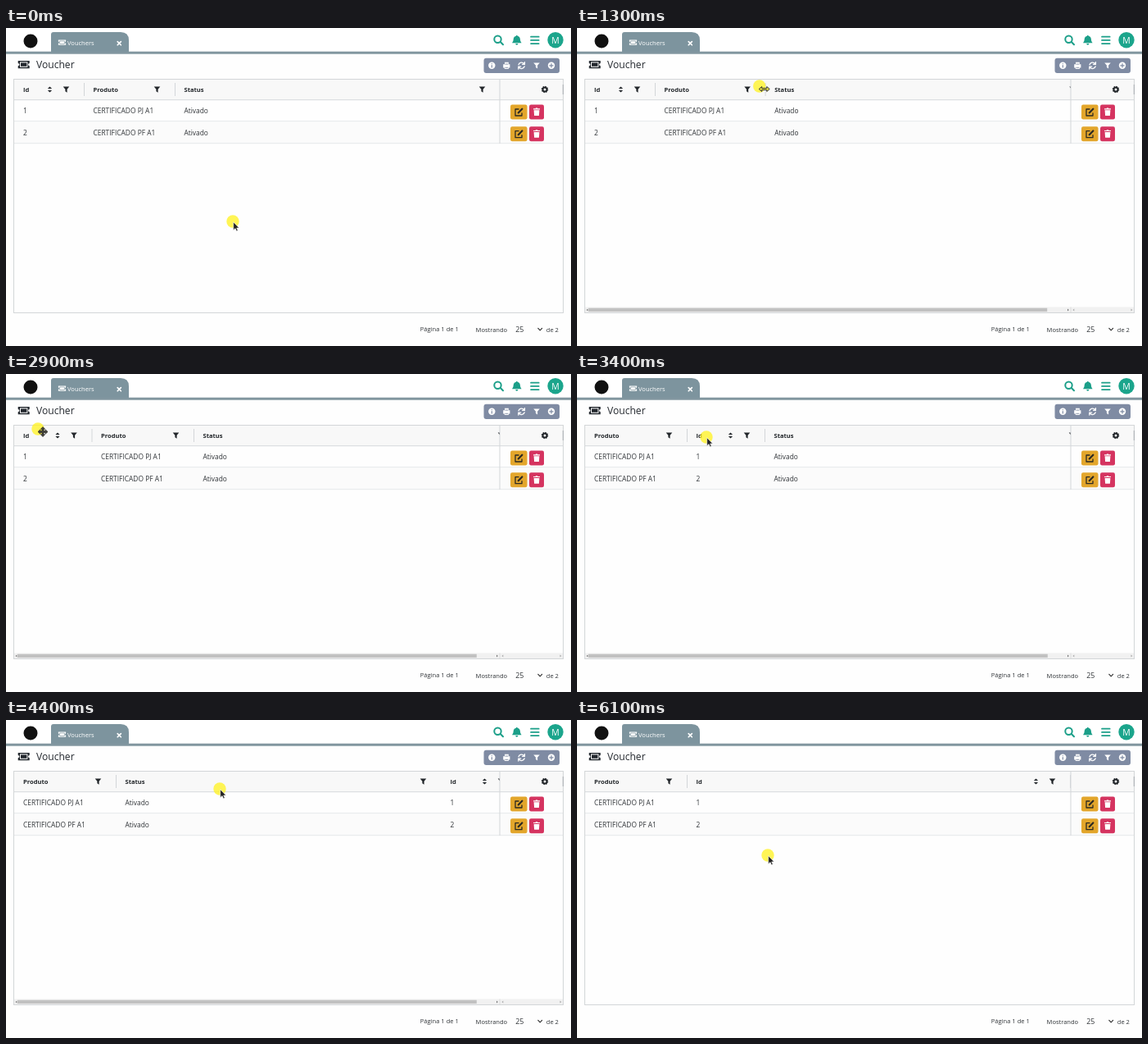
An HTML page that plays this animation: 690x388 px, repeating every 6400 ms.

```html
<!DOCTYPE html>
<html lang="pt-BR">
<head>
<meta charset="utf-8">
<title>Voucher</title>
<style>
  html, body { margin: 0; width: 100%; height: 100%; overflow: hidden; background: #fefefe; }
  svg { display: block; }
  text { font: 8.4px "Open Sans", "Noto Sans", sans-serif; fill: #303438; }
  .head { font-size: 7.6px; font-weight: 700; fill: #22262a; }
  .small { font-size: 7.55px; }
  .title { font-size: 12.1px; font-weight: 500; fill: #23282e; }
  .white { fill: #fff; }
  .line { fill: none; stroke-linecap: round; stroke-linejoin: round; }
</style>
</head>
<body>
<svg id="stage" width="690" height="388" viewBox="0 0 690 388">
  <defs>
    <path id="funnel" d="M-3.8-3.4H3.8L1.1-.2V3.7L-1.1 2.2V-.2Z"/>
    <path id="sort" d="M-2.6-.9L0-3.6L2.6-.9ZM-2.6.9L0 3.6L2.6.9Z"/>
    <g id="ticket">
      <path fill="currentColor" d="M-7-4.7H7V-1.7A1.7 1.7 0 0 0 7 1.7V4.7H-7V1.7A1.7 1.7 0 0 0-7-1.7Z"/>
      <rect x="-4.2" y="-2.7" width="8.4" height="5.4" fill="none" stroke="var(--inner)" stroke-width="1"/>
    </g>
    <g id="gear">
      <circle r="2.5" fill="none" stroke="#22262a" stroke-width="2"/>
      <circle r="3.6" fill="none" stroke="#22262a" stroke-width="1.3" stroke-dasharray="1.41"/>
    </g>
    <g id="actions">
      <rect x="616" y="93.5" width="20.5" height="18" rx="2.2" fill="#e3a62b"/>
      <g class="line" stroke="#2d2a22" stroke-width="1.3">
        <path d="M626 99H622V107H630V104"/>
        <path d="M625.7 103.5L630.3 98.8" stroke-width="2.3"/>
      </g>
      <rect x="639" y="93.5" width="18" height="18" rx="2.2" fill="#d53460"/>
      <path class="white" d="M644 98.3H646.6L647 97.5H649L649.4 98.3H652V99.4H644ZM644.6 100.2H651.4L650.9 107H645.1Z"/>
    </g>
    <path id="arrow" d="M0 0V10L2.3 7.9L3.9 11.2L5.5 10.4L4 7.3H7Z" fill="#222" stroke="#fff" stroke-width=".6"/>
    <path id="resize" d="M-6.5 0L-3-3V-1H3V-3L6.5 0L3 3V1H-3V3Z" fill="#e6df45" stroke="#333" stroke-width="1"/>
    <path id="move" d="M0-6L2.6-3.2H1V-1H3.2V-2.6L6 0L3.2 2.6V1H1V3.2H2.6L0 6L-2.6 3.2H-1V1H-3.2V2.6L-6 0L-3.2-2.6V-1H-1V-3.2H-2.6Z" fill="#44443a" stroke="#222" stroke-width=".7"/>
    <clipPath id="scrollArea"><rect x="10" y="63" width="593" height="284"/></clipPath>
  </defs>

  <!-- top bar -->
  <rect width="690" height="29" fill="#fff"/>
  <rect y="28.7" width="690" height="3" fill="#81969f"/>
  <circle cx="30" cy="16" r="8.5" fill="#111"/>
  <path d="M55 29V8Q55 5 58 5H140Q150 5 150 15V29Z" fill="#7d949e"/>
  <use href="#ticket" transform="translate(68.5 17.7) scale(.66)" style="color:#fff;--inner:#7d949e"/>
  <text class="small white" x="75" y="20.7">Vouchers</text>
  <path class="line" d="M136.2 16.6L140.4 20.8M140.4 16.6L136.2 20.8" stroke="#fff" stroke-width="1.6"/>
  <g class="line" stroke="#1c9f89" stroke-width="2">
    <circle cx="600.5" cy="13.7" r="4.2"/>
    <path d="M603.8 17L607 20.2"/>
    <path d="M641 10.7H650.7M641 14.9H650.7M641 19.1H650.7" stroke-width="1.7"/>
  </g>
  <path fill="#1c9f89" d="M618 18.2Q619.7 16.7 619.7 13.7Q619.9 10.5 623 9.8V9H624.6V9.8Q627.7 10.5 627.9 13.7Q627.9 16.7 629.6 18.2ZM622.2 19H625.4Q625.2 20.8 623.8 20.8Q622.4 20.8 622.2 19"/>
  <circle cx="671" cy="14.7" r="9.7" fill="#1ba58c"/>
  <text class="white" x="671" y="18.6" text-anchor="middle" style="font-size:10.5px">M</text>

  <!-- title and toolbar -->
  <use href="#ticket" transform="translate(21.7 44.6)" style="color:#23282e;--inner:#fefefe"/>
  <text class="title" x="37" y="49">Voucher</text>
  <rect x="583.5" y="36.7" width="92.5" height="18.3" rx="3" fill="#7f8ba3"/>
  <g class="white">
    <circle cx="593.3" cy="45.8" r="4.2"/>
    <path d="M609 41.8H613.8V44.3H615.4V48.4H613.8V50H608.8V48.4H607.2V44.3H609Z"/>
    <use href="#funnel" x="648" y="45.8"/>
    <circle cx="666" cy="45.8" r="4.2"/>
  </g>
  <g class="line" stroke="#7f8ba3" stroke-width="1.2">
    <path d="M593.3 43.6V43.7M593.3 45.6V48M663.8 45.8H668.2M666 43.6V48"/>
    <path d="M609.8 44.1H613M609.8 48.3H612.8" stroke-width=".9"/>
  </g>
  <path class="line" stroke="#fff" stroke-width="1.3" d="M626 44.8A3.8 3.8 0 0 1 632.6 43.5M633.4 41.6V44.4H630.6M633.2 46.8A3.8 3.8 0 0 1 626.6 48.1M625.8 50V47.2H628.6"/>

  <!-- grid -->
  <rect x="9.5" y="62.5" width="671" height="285" fill="#fefefe" stroke="#d3d6d8"/>
  <rect x="10" y="63" width="670" height="25" fill="#f8f8f8"/>
  <rect x="10" y="114" width="670" height="27" fill="#fbfbfb"/>
  <path d="M10 87.7H680" stroke="#d6d9dc"/>
  <path d="M10 113.7H680M10 140.7H680" stroke="#e5e8ea"/>
  <g id="columns" clip-path="url(#scrollArea)"></g>
  <path d="M603 63V141" stroke="#d3d6d9"/>
  <path d="M680.3 69V81" stroke="#a5abb0"/>
  <use href="#gear" x="658" y="75"/>
  <use href="#actions"/>
  <use href="#actions" y="26.7"/>

  <g id="scrollbar">
    <rect x="10" y="340.5" width="670" height="6.5" fill="#f1f1f1"/>
    <rect id="thumb" x="14" y="341.7" height="4.4" fill="#c1c1c1"/>
    <path fill="#777" d="M13.3 342.5V345.5L11.5 344ZM599 342.5V345.5L600.8 344Z"/>
    <path fill="#aaa" d="M607.3 342.5V345.5L605.5 344ZM676.5 342.5V345.5L678.3 344Z"/>
    <path d="M603 340.5V347" stroke="#ddd"/>
  </g>

  <!-- footer -->
  <text class="small" x="505.8" y="370.3">Página 1 de 1</text>
  <text class="small" x="573.6" y="370.5">Mostrando</text>
  <text x="622.3" y="370.8" style="font-size:8.9px">25</text>
  <path class="line" d="M649.8 366.4L652.2 368.8L654.6 366.4" stroke="#333" stroke-width="1.2"/>
  <text class="small" x="659.8" y="370.5">de 2</text>

  <g id="pointer">
    <circle r="7.7" fill="#fff21f" fill-opacity=".76"/>
    <use id="shape"/>
  </g>
</svg>
<script>
const LOOP = 6400, STEP = 100;
const LEFT = 10, VIEW = 593, STATUS_WIDTH = 397;
const $ = id => document.getElementById(id);

// Each row: time, then values
const pointerPath = [
  [0, 277, 236], [200, 266, 212], [500, 213, 94], [700, 199, 70], [1000, 252, 71],
  [1400, 213, 71], [1700, 90, 70], [1900, 198, 71], [2000, 178, 71], [2300, 99, 70],
  [2600, 62, 69], [2900, 39, 67], [3200, 148, 71], [3400, 158, 77], [3600, 152, 74],
  [4100, 255, 77], [4400, 261, 84], [4600, 160, 75], [4800, 176, 62], [4900, 187, 48],
  [5000, 196, 40], [5200, 196, 40], [5500, 216, 103], [5800, 233, 165]
];
const idWidths = [[1700, 85.5], [1900, 212], [2000, 205], [2300, 95], [4900, 95], [5000, 468]];
const productWidths = [[700, 111], [1000, 165], [1400, 124.5]];
const orders = [[3000, 0], [3200, 1], [3700, 1], [3900, 2], [4800, 2], [4900, 1]];
const shapes = [
  [0, 'arrow'], [600, 'resize'], [2400, 'arrow'], [2800, 'move'], [3300, 'arrow'],
  [3600, 'move'], [4200, 'arrow'], [4700, 'move'], [5000, 'arrow']
];

function track(keys, t) {
  const next = keys.findIndex(key => key[0] > t);
  if (next === 0) return keys[0].slice(1);
  if (next < 0) return keys[keys.length - 1].slice(1);
  const a = keys[next - 1], b = keys[next];
  const k = (t - a[0]) / (b[0] - a[0]);
  return a.slice(1).map((v, i) => v + (b[i + 1] - v) * k);
}

function makeColumn(name, values, { sortable, resizable = true } = {}) {
  const group = document.createElementNS('http://www.w3.org/2000/svg', 'g');
  group.innerHTML = `
    <text class="head" x="11" y="78">${name}</text>
    ${values.map((v, i) => `<text x="11" y="${104.3 + i * 26.7}">${v}</text>`).join('')}
    <g class="edge" fill="#22262a">
      <use href="#funnel" x="-22" y="75"/>
      ${sortable ? '<use href="#sort" x="-42" y="75"/>' : ''}
      ${resizable ? '<path d="M0 67V83" stroke="#d3d6d9"/>' : ''}
    </g>`;
  $('columns').append(group);
  const edge = group.querySelector('.edge');
  return (x, width) => {
    group.setAttribute('transform', `translate(${LEFT + x} 0)`);
    edge.setAttribute('transform', `translate(${width} 0)`);
    return group;
  };
}

const placeId = makeColumn('Id', [1, 2], { sortable: true });
const placeProduct = makeColumn('Produto', ['CERTIFICADO PJ A1', 'CERTIFICADO PF A1']);
const placeStatus = makeColumn('Status', ['Ativado', 'Ativado'], { resizable: false });

function render(t) {
  const [idWidth] = track(idWidths, t);
  const [productWidth] = track(productWidths, t);
  const [order] = track(orders, t);
  const both = idWidth + productWidth;

  // Column offsets for the three orders, blended while columns trade places
  const offset = (...xs) => track(xs.map((x, i) => [i, x]), order)[0];
  placeId(offset(0, productWidth, productWidth + STATUS_WIDTH), idWidth);
  placeProduct(offset(idWidth, 0, 0), productWidth);
  const status = placeStatus(offset(both, both, productWidth), STATUS_WIDTH);

  const statusShown = t < 4900;
  status.style.display = statusShown ? '' : 'none';
  const total = both + STATUS_WIDTH;
  $('thumb').setAttribute('width', statusShown ? 583 * VIEW / total : 0);
  $('scrollbar').style.display = total > VIEW + 1 && t < 5000 ? '' : 'none';

  const [x, y] = track(pointerPath, t);
  const shape = shapes.filter(key => key[0] <= t).pop()[1];
  $('pointer').setAttribute('transform', `translate(${x} ${y})`);
  $('shape').setAttribute('href', '#' + shape);
  $('shape').setAttribute('transform', shape === 'arrow' ? 'translate(.7 .7)' : 'translate(6 3.5)');
}

const start = performance.now();
function tick(now) {
  const t = Math.max(0, now - start) % LOOP;
  render(Math.floor(t / STEP) * STEP);
  requestAnimationFrame(tick);
}
render(0);
requestAnimationFrame(tick);
</script>
</body>
</html>
```
